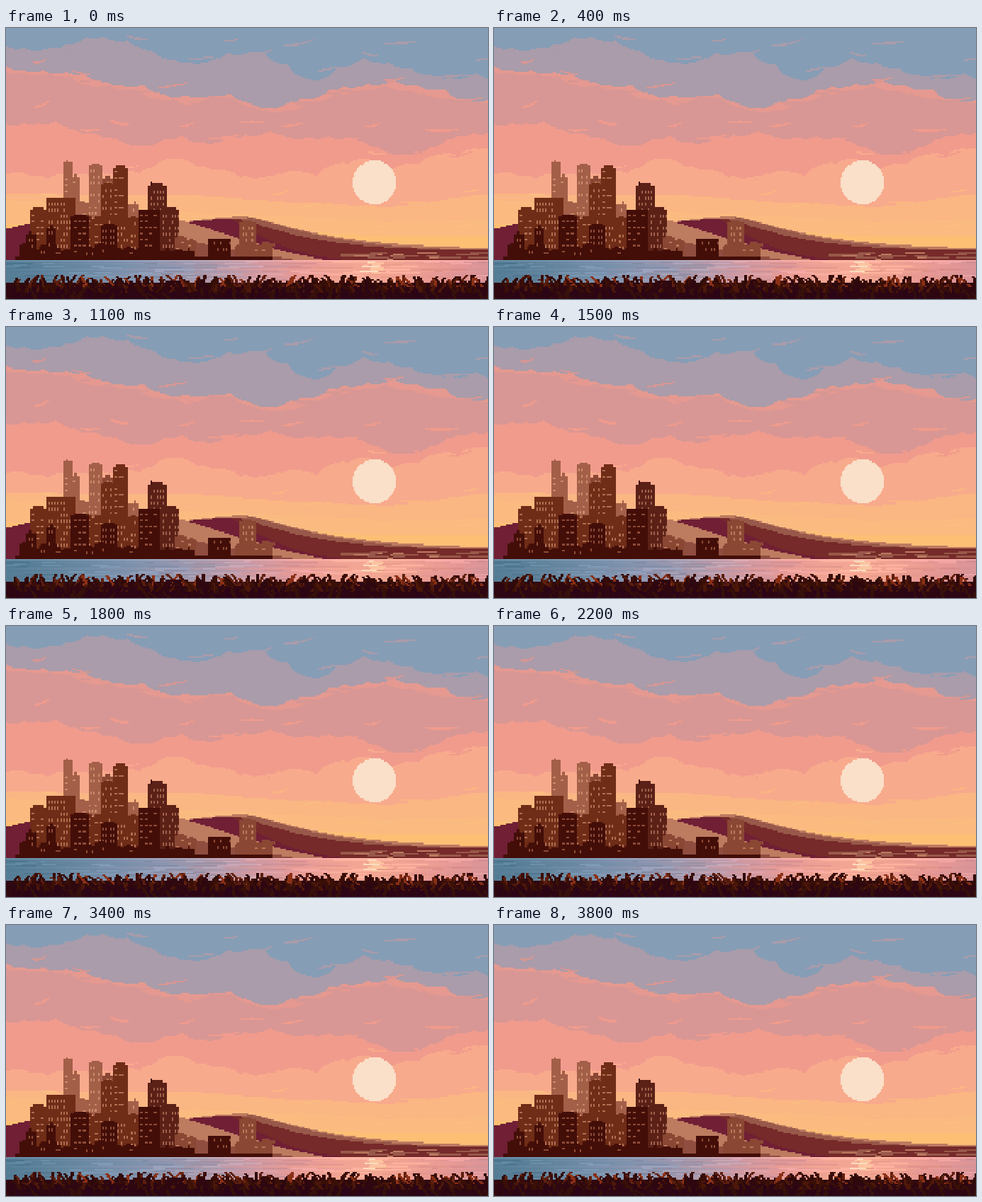
An HTML page with a canvas for the animation above (3900 ms loop, 680 px wide and 383 px high).

```html
<!DOCTYPE html>
<html lang="en">
<head>
<meta charset="utf-8">
<title>Sunset city</title>
<style>
html, body { margin: 0; width: 100%; height: 100%; overflow: hidden; background: #869db6; }
canvas { display: block; width: 100vw; height: 100vh; image-rendering: pixelated; }
</style>
</head>
<body>
<canvas id="view" width="320" height="180"></canvas>
<script>
const W = 320, H = 180, STAGE_W = 680, SX = W / STAGE_W, SY = H / 383;
const LOOP = 3900, STEP = 100, TAU = Math.PI * 2;

const view = document.getElementById('view').getContext('2d');
const makeLayer = () => {
  const c = document.createElement('canvas');
  c.width = W; c.height = H;
  return c.getContext('2d', { willReadFrequently: true });
};
const scene = makeLayer(), scratch = makeLayer();

const hash = (a, b = 0) => {
  const v = Math.sin(a * 127.1 + b * 311.7) * 43758.5453;
  return v - Math.floor(v);
};
const randomizer = seed => {
  let n = 0;
  return (lo = 0, hi = 1) => lo + (hi - lo) * hash(++n, seed);
};
const clamp01 = v => Math.min(1, Math.max(0, v));

// Linear value at u (0..1) in a list of evenly spaced keys.
function level(keys, u) {
  const p = clamp01(u) * (keys.length - 1), i = Math.min(Math.floor(p), keys.length - 2);
  return keys[i] + (keys[i + 1] - keys[i]) * (p - i);
}

// Paints a path given in stage units as hard-edged pixels.
function shape(color, trace) {
  scratch.setTransform(1, 0, 0, 1, 0, 0);
  scratch.clearRect(0, 0, W, H);
  scratch.setTransform(SX, 0, 0, SY, 0, 0);
  scratch.fillStyle = color;
  scratch.beginPath();
  trace(scratch);
  scratch.fill();
  const img = scratch.getImageData(0, 0, W, H), d = img.data;
  for (let i = 3; i < d.length; i += 4) d[i] = d[i] > 120 ? 255 : 0;
  scratch.putImageData(img, 0, 0);
  scene.drawImage(scratch.canvas, 0, 0);
}

function block(color, x, y, w, h) {
  const left = Math.round(x * SX), top = Math.round(y * SY);
  scene.fillStyle = color;
  scene.fillRect(left, top, Math.round((x + w) * SX) - left, Math.round((y + h) * SY) - top);
}

// Sky above a line of seeded lobes; a positive bulge hangs downwards.
function bank(color, keys, bulge, seed, offset = 0) {
  const rand = randomizer(seed), rough = Math.abs(bulge) * 26;
  shape(color, g => {
    let x = 0, y = keys[0] + offset;
    g.moveTo(0, 0);
    g.lineTo(x, y);
    while (x < STAGE_W) {
      const nx = x + rand(14, 40), ny = level(keys, nx / STAGE_W) + offset + rand(-rough, rough);
      g.quadraticCurveTo((x + nx) / 2 - (ny - y) * bulge, (y + ny) / 2 + (nx - x) * bulge, nx, ny);
      [x, y] = [nx, ny];
    }
    g.lineTo(STAGE_W, 0);
  });
}

// Curved slivers of cloud scattered around a line.
function wisps(color, keys, spread, count, seed, thick = 7) {
  const rand = randomizer(seed);
  for (let i = 0; i < count; i++) {
    const x = (i + rand()) / count * STAGE_W, y = level(keys, x / STAGE_W) + rand(-spread, spread);
    const dx = rand(26, 58), dy = rand(-12, 8), bend = rand(-2, 6);
    shape(color, g => {
      g.moveTo(x, y);
      g.quadraticCurveTo(x + dx * .55, y + dy / 2 + bend, x + dx, y + dy);
      g.quadraticCurveTo(x + dx * .45, y + dy / 2 + bend + thick, x, y);
    });
  }
}

function paintSky() {
  const blue = [25, 24, 12, 24, 46, 38, 29, 76, 38, 48, 66, 68];
  const mauve = [58, 62, 76, 84, 103, 90, 120, 98, 82, 80, 93, 106];
  const dusty = [136, 133, 153, 169, 155, 160, 150, 156, 156, 174, 158, 146];
  const salmon = [207, 207, 203, 207, 183, 208, 212, 207, 185, 198, 180, 173];
  const light = [234, 236, 236, 246, 252, 233];
  const peach = [242, 253, 259, 266, 273, 270];
  const glow = [276, 278, 282, 288, 294, 294];

  block('#fdbf74', 0, 0, STAGE_W, 383);
  bank('#fbbb80', glow, .04, 2);
  bank('#fab683', peach, .04, 3);
  wisps('#fbbd82', peach, 14, 7, 4);
  bank('#f8aa8c', light, .04, 5);
  wisps('#fab683', light, 10, 8, 6);
  bank('#f19b8d', salmon, -.2, 7);
  wisps('#f8aa8c', salmon, 14, 8, 8);
  bank('#d89794', dusty, .22, 9);
  wisps('#f19b8d', dusty, 30, 20, 10);
  bank('#e59990', mauve, .16, 11, 4);
  bank('#aa9caa', mauve, .22, 12, -3);
  wisps('#d89794', mauve, 14, 15, 13);
  bank('#869db6', blue, .22, 14);
  wisps('#aa9caa', blue, 24, 17, 15, 6);
  shape('#fae0c9', g => g.arc(520, 218, 31, 0, TAU));
}

// Ridge that falls away from its peak, with its own reach on each side.
function hill(color, peakX, peakY, drop, reachLeft, reachRight) {
  shape(color, g => {
    g.moveTo(0, 328);
    for (let x = 0; x <= STAGE_W; x += 4) {
      const d = Math.abs(x - peakX) / (x < peakX ? reachLeft : reachRight);
      g.lineTo(x, peakY + drop * (1 - Math.exp(-(d ** 1.3))));
    }
    g.lineTo(STAGE_W, 328);
  });
}

function paintHills() {
  hill('#bd7b60', 335, 266, 46, 290, 130);
  hill('#98584a', 345, 269, 46, 250, 125);
  hill('#762a29', 325, 270, 44, 380, 108);
  hill('#701f35', 315, 270, 62, 450, 78);
  hill('#bd7b60', 240, 271, 80, 180, 180);
  hill('#8f4d40', 200, 290, 55, 180, 190);
  hill('#701f35', 70, 268, 60, 170, 60);
  const rand = randomizer(20);
  for (let i = 0; i < 24; i++) {
    block(i % 3 ? '#98584a' : '#bd7b60', rand(460, 660), rand(316, 325), rand(8, 32), 2.2);
  }
}

// [wall, window] colours from distant to near
const TONES = [['#a35f48', '#cb8c6c'], ['#8a4733', '#b97859'], ['#6f2c17', '#b06f51'],
  ['#5b2016', '#a0614b'], ['#430e08', '#8d4a36']];

function tower(tone, x, y, w) {
  const [wall, glass] = TONES[tone];
  block(wall, x, y, w, 327 - y);
  if (w < 30) block(wall, x + 4, y - 3, w - 9, 4);
  const wide = hash(x, y) > .4, stepX = wide ? 6.4 : 4.3, winW = wide ? 4.3 : 2.1;
  for (let wy = y + 6; wy < 318; wy += 8.5) {
    for (let wx = x + 3; wx + winW < x + w - 1; wx += stepX) {
      if (hash(wx, wy) > .42) block(glass, wx, wy, winW, wide ? 2.1 : 4.2);
    }
  }
}

// A row of seeded low buildings between two x positions.
function lowRow(tone, from, to, top, bottom, seed) {
  const rand = randomizer(seed);
  for (let x = from; x < to;) {
    const w = rand(12, 24);
    tower(tone, x, rand(top, bottom), Math.min(w, to - x));
    x += w;
  }
}

function paintCity() {
  const back = [[0, 80, 190, 13], [0, 91, 210, 13], [0, 117, 194, 19], [1, 136, 212, 16]];
  const middle = [[2, 151, 197, 21], [2, 134, 222, 19], [3, 200, 223, 27], [2, 57, 241, 40],
    [2, 34, 257, 24], [3, 217, 257, 28], [1, 330, 275, 22]];
  const front = [[4, 187, 257, 30], [4, 92, 266, 25], [4, 134, 279, 23], [4, 57, 282, 14],
    [4, 28, 291, 14], [4, 285, 297, 32]];
  const raise = group => group.forEach(t => tower(...t));
  raise(back);
  lowRow(0, 80, 187, 242, 252, 30);
  raise(middle);
  lowRow(2, 94, 187, 261, 272, 31);
  lowRow(1, 238, 268, 294, 302, 32);
  lowRow(1, 322, 376, 302, 320, 33);
  raise(front);
  lowRow(4, 19, 265, 306, 317, 34);
  block('#430e08', 203, 217, 3, 6);
  block('#430e08', 12, 323, 365, 4);
}

const waterKeys = [
  [84, 100, 117, 140, 168, 205, 231, 243, 242, 230, 214],
  [124, 133, 142, 149, 153, 153, 155, 166, 165, 152, 147],
  [149, 158, 170, 175, 172, 163, 151, 147, 146, 149, 152]
];
const waterColor = (x, shade = 0) =>
  `rgb(${waterKeys.map(keys => Math.round(level(keys, x / W) + shade))})`;

function paintWater() {
  for (let y = 154; y < H; y++) {
    for (let x = 0; x < W; x += 4) {
      scene.fillStyle = waterColor(x + hash(y) * 18 - 9, y === 154 ? 20 : 0);
      scene.fillRect(x, y, 4, 1);
    }
  }
}

function drawRipples(phase) {
  for (let i = 0; i < 90; i++) {
    const wave = Math.sin(phase * 3 + hash(i, 5) * TAU);
    const w = Math.round(5 + hash(i, 3) * 18 + wave * 3);
    const x = Math.round(hash(i) * W - w / 2 + wave * 2);
    view.fillStyle = waterColor(x, hash(i, 4) > .4 ? 13 : -9);
    view.fillRect(x, 155 + Math.floor(hash(i, 2) * 13), w, 1);
  }
  for (let i = 0; i < 8; i++) {
    const w = Math.round(4 + hash(i, 8) * 8 + Math.sin(phase * 3 + i * 2.3) * 2);
    view.fillStyle = i % 3 ? '#fbc4a0' : '#fbdcc0';
    view.fillRect(Math.round(246 + (hash(i, 9) - .5) * 12 - w / 2), 155 + i, w, 1);
  }
}

// Three overlapping rows of bent blades, the nearest one drawn last.
function drawGrass(phase) {
  const rows = [
    { base: 171, colors: ['#3a0d08', '#2f0a09', '#5e1f0e', '#8a3016'] },
    { base: 175, colors: ['#3a1006', '#2e0711', '#4d180a'] },
    { base: 180, colors: ['#2c0515', '#36100a', '#2b0418'] }
  ];
  view.fillStyle = '#2e0711';
  view.fillRect(0, 169, W, 11);
  rows.forEach(({ base, colors }, row) => {
    for (let i = -1; i < W / 2.6; i++) {
      const root = i * 2.6 + hash(i, row) * 2, height = 4 + Math.floor(hash(i, row + 4) * 4);
      const lean = (hash(i, row + 8) - .5) * 12;
      const sway = Math.sin(phase * 3 + root * .045) * 1.4;
      view.fillStyle = colors[Math.floor(hash(i, row + 12) ** 1.4 * colors.length)];
      for (let j = 0; j <= height; j++) {
        const k = j / height;
        view.fillRect(Math.round(root + lean * k + sway * k * k), base - j, 2, 1);
      }
    }
  });
}

paintSky();
paintHills();
paintCity();
paintWater();

const start = performance.now();
function draw() {
  const time = Math.floor(((performance.now() - start) % LOOP) / STEP) * STEP;
  const phase = time / LOOP * TAU;
  view.drawImage(scene.canvas, 0, 0);
  drawRipples(phase);
  drawGrass(phase);
  requestAnimationFrame(draw);
}
draw();
</script>
</body>
</html>
```
